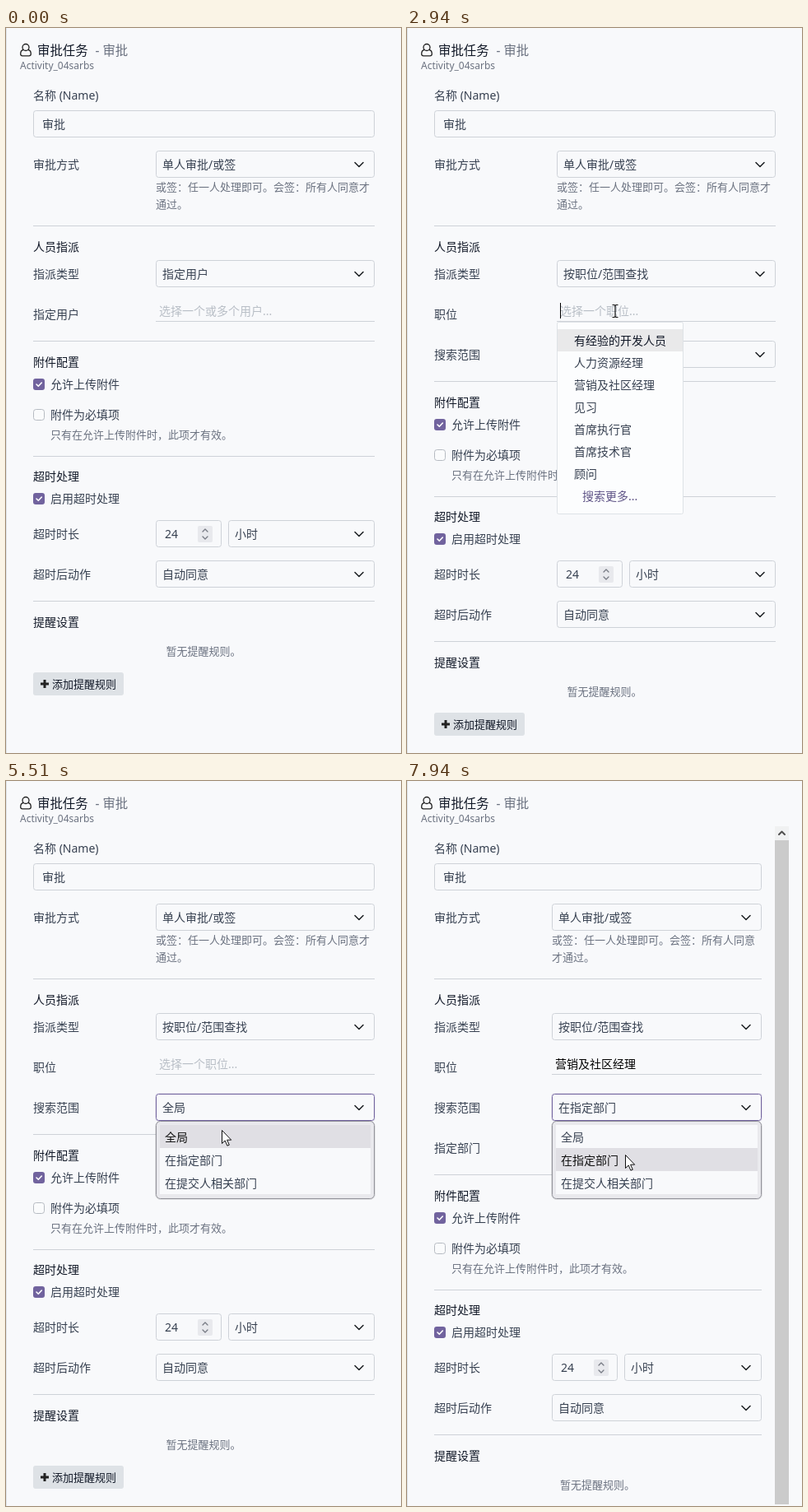
An HTML page for the animation above (8000 ms loop, 480x881 px).

```html
<!DOCTYPE html>
<html lang="zh-CN">
<head>
<meta charset="utf-8">
<title>审批任务</title>
<style>
html, body { margin: 0; height: 100%; overflow: hidden; background: #f8f9fb; }
svg { display: block; font-family: 'Noto Sans', 'Noto Sans CJK SC', sans-serif; white-space: pre; }
</style>
</head>
<body>
<svg width="480" height="881" viewBox="0 0 480 881"><g id="form"></g><g id="cursor"></g></svg>
<script>
const LOOP = 8000;
const INK = '#374151', DARK = '#111827', MUTED = '#6b7280', HINT = '#b8bec6', LINE = '#ced2d8', ACCENT = '#71639e';
const ASSIGN = ['指定用户', '按职位/范围查找', '按汇报关系查找'];
const SCOPE = ['全局', '在指定部门', '在提交人相关部门'];
const ROLES = ['有经验的开发人员', '人力资源经理', '营销及社区经理', '见习', '首席执行官', '首席技术官', '顾问'];

// Pointer path: time, x, y
const PATH = [
  [220, 137, 125], [800, 285, 290], [1360, 285, 290], [1680, 262, 367], [2340, 262, 367],
  [2700, 253, 344], [3270, 253, 344], [3870, 255, 430], [3990, 255, 435], [4110, 255, 435],
  [4510, 255, 444], [4870, 255, 444], [5150, 264, 400], [5300, 264, 400], [5510, 262, 424],
  [5670, 262, 434], [5830, 259, 454], [6160, 259, 454], [6400, 260, 473], [7060, 260, 473],
  [7360, 266, 396], [7500, 266, 396], [7860, 265, 445], [7900, 265, 454]
];
const CURSORS = {
  arrow: '<path d="M.5.5v16l3.7-3.5 2.7 6.2 2.4-1-2.7-6h5.1z" fill="#fff" stroke="#111"/>',
  beam: '<path d="M-3.5-7.5h2.5l1 1 1-1h2.5M0-7V7M-3.5 7.5h2.5l1-1 1 1h2.5" fill="none" stroke="#111" stroke-width="1.2"/>',
  hand: '<path d="M-2 12.5V1.5a1.7 1.7 0 0 1 3.4 0v6q3-.6 3.2 1 2.8-.6 3 1 2.6-.2 2.6 2v4q0 2-1.6 4V22h-9v-2q-1-1.8-5-6.5-1.6-2.2-.2-3 1.5-.8 3.6 2z" fill="#fff" stroke="#111"/><path d="M1.5 7.5v4M4.6 8.5v3M7.6 9.5v2.5" stroke="#111"/>'
};

// Text is placed by the vertical centre of its line
const text = (x, cy, s, fill = INK, size = 14, anchor = 'start') =>
  `<text x="${x}" y="${cy + Math.round(size * .37)}" font-size="${size}" fill="${fill}" text-anchor="${anchor}">${s}</text>`;
const heading = (cy, s) => `<g font-weight="500">${text(33, cy, s, DARK)}</g>`;
const rect = (x, y, w, h, fill, r = 0) => `<rect x="${x}" y="${y}" width="${w}" height="${h}" rx="${r}" fill="${fill}"/>`;
const frame = (x, y, w, h, stroke = LINE, fill = 'none', r = 3) =>
  `<rect x="${x + .5}" y="${y + .5}" width="${w - 1}" height="${h - 1}" rx="${r}" fill="${fill}" stroke="${stroke}"/>`;
const stroke = (d, color = INK, width = 1.5) =>
  `<path d="${d}" fill="none" stroke="${color}" stroke-width="${width}" stroke-linecap="round" stroke-linejoin="round"/>`;

function select(x, right, cy, value, focused) {
  const w = right - x;
  return (focused ? frame(x - 1, cy - 18, w + 2, 35, '#e6e4ee', 'none', 4) : '')
    + frame(x, cy - 17, w, 33, focused ? ACCENT : LINE)
    + text(x + 8, cy, value) + stroke(`M${right - 24} ${cy - 2.5}l5 5 5-5`, '#212529', 1.6);
}
function checkbox(cy, label, on) {
  return (on ? rect(33, cy - 7, 14, 14, ACCENT, 3) + stroke(`M37 ${cy}l2.3 2.3 4-4.3`, '#fff', 1.6)
             : frame(33, cy - 7, 14, 14, '#b6bbc2', '#fafbfc')) + text(54, cy, label);
}
function popup(x, right, top, options, active) {
  const row = (s, i) => rect(x + 5, top + 5 + 28 * i, right - x - 10, 28, i === active ? '#e0dfe4' : '#f8f9fb')
    + text(x + 11, top + 20 + 28 * i, s, i === active ? '#111' : INK);
  return `<g opacity=".1">${frame(x - 1, top, right - x + 2, 96, '#000', 'none', 6)}</g>`
    + frame(x, top, right - x, 95, '#93939b', '#e9e9ed', 5) + options.map(row).join('');
}
function roleList(active) {
  const row = (s, i) => (i === active ? rect(183, 366 + 27 * i, 152, 27, '#e9e9ea') : '')
    + text(203, 380 + 27 * i, s, i === active ? DARK : INK);
  return frame(182, 357, 154, 234, '#dee2e6', '#fcfdfe', 2) + ROLES.map(row).join('')
    + text(213, 569, '搜索更多...', '#5f5487');
}

function drawForm({ stage, focus, menu, active, caret }) {
  const wide = stage < 2, left = wide ? 182 : 176, right = wide ? 448 : 431, dy = stage * 49;
  const rule = (y, x = 33) => rect(x, y, right - x, 1, LINE);
  const field = (cy, label, value, color = HINT) =>
    text(33, cy, label) + text(left + 4, cy - 4, value, color) + rule(cy + 8, left);
  const help = wide ? ['才', ''] : ['', '才'];

  let out = rect(0, 0, 1, 881, '#dee2e6')
    + stroke('M21 26.5C18.5 27 17.7 29 17.7 31.5q0 2.4 2.3 2.4h8q2.3 0 2.3-2.4c0-2.5-.8-4.5-3.3-5', '#222', 1.3)
    + '<circle cx="24" cy="23.5" r="4" fill="none" stroke="#222" stroke-width="1.3"/>'
    + `<g font-weight="500">${text(38, 27, '审批任务', DARK, 15.4)}</g>` + text(108.5, 27, '- 审批', MUTED, 15.4)
    + text(17, 46, 'Activity_04sarbs', MUTED, 12)
    + text(33, 82, '名称 (Name)') + frame(33, 100, right - 33, 33) + text(44, 117, '审批')
    + text(33, 166, '审批方式') + select(left, right, 166, '单人审批/或签')
    + text(left, 193, '或签：任一人处理即可。会签：所有人同意' + help[0], MUTED, 13)
    + text(left, 214, help[1] + '通过。', MUTED, 13)
    + rule(240) + heading(266, '人员指派')
    + text(33, 299, '指派类型') + select(left, right, 299, ASSIGN[stage ? 1 : 0], focus === 1);

  if (!stage) out += field(348, '指定用户', '选择一个或多个用户...');
  else {
    out += wide ? field(348, '职位', '选择一个职位...') : field(348, '职位', ROLES[2], '#000');
    out += text(33, 397, '搜索范围') + select(left, right, 397, SCOPE[stage - 1], focus === 2);
  }
  if (!wide) out += field(446, '指定部门', '选择一个部门...');
  if (caret) out += rect(186, 334, 1, 19, '#000');

  out += `<g transform="translate(0 ${dy})">`
    + rule(380) + heading(406, '附件配置') + checkbox(433, '允许上传附件', true)
    + checkbox(470, '附件为必填项') + text(54, 494, '只有在允许上传附件时，此项才有效。', MUTED, 13)
    + rule(520) + heading(545, '超时处理') + checkbox(572, '启用超时处理', true)
    + text(33, 615, '超时时长') + frame(left, 598, 80, 33) + text(left + 11, 615, '24')
    + rect(left + 51, 605, 18, 20, '#e8e9ed', 2)
    + stroke(`M${left + 57} 612l3-3 3 3m-6 6l3 3 3-3`, '#777b84', 1.3)
    + select(left + 88, right, 615, '小时')
    + text(33, 664, '超时后动作') + select(left, right, 664, '自动同意')
    + rule(696) + heading(722, '提醒设置')
    + text((33 + right) / 2 - .5, 757, '暂无提醒规则。', MUTED, 13, 'middle')
    + rect(33, 783, 110, 28, '#dee2e6', 3) + rect(42, 795.5, 10, 3, '#222') + rect(45.5, 792, 3, 10, '#222')
    + text(56, 797, '添加提醒规则', DARK, 13) + '</g>';

  if (!wide) out += rect(447, 55, 17, 17, '#f0f1f2') + rect(447, 72, 17, 807, '#cbcbcb')
    + stroke('M452 65l3.5-3.5 3.5 3.5', '#505050', 2);
  if (menu === 'assign') out += popup(left, right, 315, ASSIGN, active);
  if (menu === 'scope') out += popup(left, right, 413, SCOPE, active);
  if (menu === 'role') out += roleList(active);
  return out;
}

function pointerAt(t) {
  const i = PATH.findIndex(p => p[0] > t);
  if (i < 0) return PATH[PATH.length - 1].slice(1);
  if (!i) return PATH[0].slice(1);
  const [t0, x0, y0] = PATH[i - 1], [t1, x1, y1] = PATH[i];
  const u = (t - t0) / (t1 - t0), e = u * u * (3 - 2 * u);
  return [x0 + (x1 - x0) * e, y0 + (y1 - y0) * e];
}

function stateAt(t, y) {
  const within = (a, b) => t >= a && t < b;
  const stage = t < 1970 ? 0 : t < 6770 ? 1 : 2;
  const focus = within(760, 2820) ? 1 : t >= 5230 ? 2 : 0;
  const menu = within(1000, 1970) ? 'assign' : within(2860, 4670) ? 'role'
    : within(5230, 6770) || t >= 7480 ? 'scope' : '';
  const [top, height] = { assign: [320, 28], role: [366, 27], scope: [418, 28] }[menu] || [0, 1];
  const active = !menu ? -1 : y >= top ? Math.floor((y - top) / height) : stage === 2 ? 1 : 0;
  const caret = within(2820, 5230) && (t - 2820) % 1060 < 530;
  return { stage, focus, menu, active, caret };
}

function cursorShape({ stage, menu }, y) {
  if (menu === 'role' && y >= 358) return 'hand';
  const overInput = y < 133 || stage && y > 331 && y < 357 || stage === 2 && !menu && y > 430 && y < 455;
  return overInput ? 'beam' : 'arrow';
}

const form = document.getElementById('form'), cursor = document.getElementById('cursor');
let lastKey, lastShape;
function tick() {
  const t = performance.now() % LOOP;
  const [x, y] = pointerAt(t), state = stateAt(t, y);
  const key = JSON.stringify(state), shape = t < 200 ? '' : cursorShape(state, y);
  if (key !== lastKey) form.innerHTML = drawForm(state);
  if (shape !== lastShape) cursor.innerHTML = CURSORS[shape] || '';
  cursor.setAttribute('transform', `translate(${Math.round(x)} ${Math.round(y)})`);
  [lastKey, lastShape] = [key, shape];
  requestAnimationFrame(tick);
}
tick();
</script>
</body>
</html>
```
